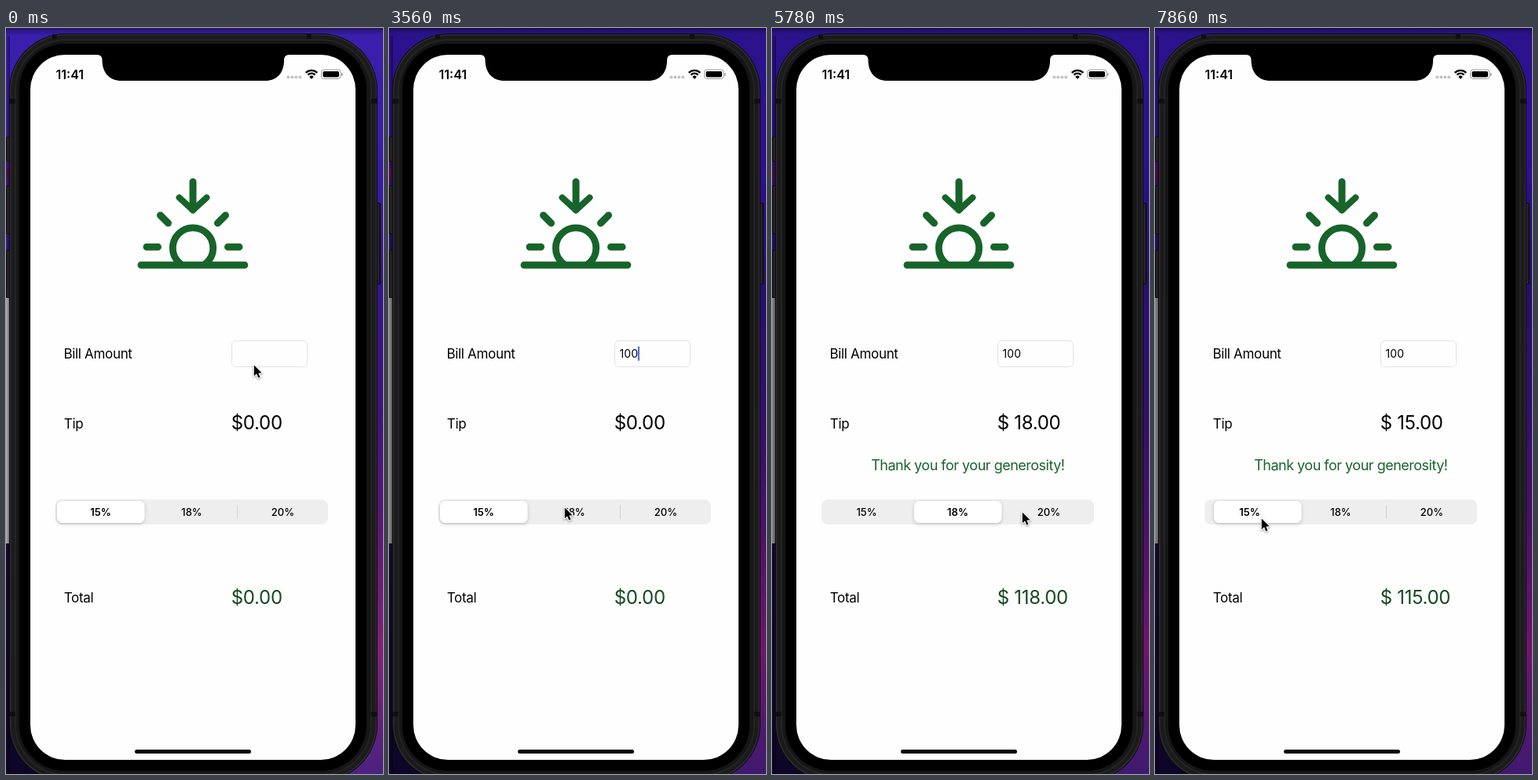
These frames come from a looping animation (480 by 948 pixels, 8000 ms). An HTML page with a canvas:

```html
<!DOCTYPE html>
<html lang="en">
<head>
<meta charset="utf-8">
<title>Tip calculator</title>
<style>
html, body { margin: 0; width: 480px; height: 948px; overflow: hidden; background: #000; }
canvas { display: block; }
</style>
</head>
<body>
<canvas id="stage" width="480" height="948"></canvas>
<script>
const ctx = document.getElementById('stage').getContext('2d');
const LOOP = 8000, TICK = 148.4;
const GREEN = '#17642b', DARK_GREEN = '#154a22';
const SEGMENTS = ['15%', '18%', '20%'];
const PILL_X = [65, 181, 297];

// [tick, value]: each value holds until the next key
const TYPED = [[0, ''], [9, '1'], [14, '10'], [15, '100']];
const CARET = [
  [0, 0], [4, 1], [7, .4], [8, 0], [9, 1], [12, .4], [13, 0], [14, 1],
  [18, .4], [19, 0], [22, .4], [23, 1], [26, .4], [27, 0],
  [32, .2], [33, .5], [34, .8], [35, 1], [37, .4], [38, 0],
  [41, .4], [42, 1], [45, .4], [46, 0], [49, .4], [50, 1], [52, .4], [53, 0]
];
const PICKS = [
  { at: 25, from: 0, to: 1, tip: 18 },
  { at: 41, from: 1, to: 2, tip: 20 },
  { at: 52, from: 2, to: 0, tip: 15 }
];
const MOVES = [
  { start: 0, end: 2, from: [315, 428], to: [305, 411], dip: 0 },
  { start: 17, end: 24, from: [305, 411], to: [223, 609], dip: 0 },
  { start: 36, end: 39, from: [223, 609], to: [318, 615], dip: 0 },
  { start: 44, end: 50, from: [318, 615], to: [135, 623], dip: 3 }
];

const held = (keys, n) => keys.filter(k => k[0] <= n).pop()[1];

function box(x, y, w, h, r, fill) {
  ctx.beginPath();
  ctx.roundRect(x, y, w, h, r);
  if (fill) {
    ctx.fillStyle = fill;
    ctx.fill();
  }
}

function lines(color, width, ...paths) {
  ctx.strokeStyle = color;
  ctx.lineWidth = width;
  ctx.lineCap = ctx.lineJoin = 'round';
  ctx.beginPath();
  for (const [first, ...rest] of paths) {
    ctx.moveTo(...first);
    rest.forEach(p => ctx.lineTo(...p));
  }
  ctx.stroke();
}

function label(text, x, y, size, { color = '#000', weight = 400, spacing = 0, align = 'left' } = {}) {
  ctx.font = `${weight} ${size}px Inter, sans-serif`;
  ctx.letterSpacing = spacing + 'px';
  ctx.textAlign = align;
  ctx.fillStyle = color;
  ctx.fillText(text, x, y);
}

function gradient(y0, y1, ...colors) {
  const g = ctx.createLinearGradient(0, y0, 0, y1);
  colors.forEach((c, i) => g.addColorStop(i / (colors.length - 1), c));
  return g;
}

function drawDesktop(focused) {
  ctx.fillStyle = focused
    ? gradient(0, 948, '#2b138c', '#2c1192', '#27106f', '#300f6d', '#4b1069', '#6f1570', '#3f1a70')
    : gradient(0, 948, '#3a1fae', '#3a1cae', '#33168c', '#3d1480', '#5c1678', '#84207c', '#4c2280');
  ctx.fillRect(0, 0, 480, 948);
  ctx.fillStyle = gradient(0, 10, focused ? '#1c0b50' : '#271360', 'rgba(40,20,130,0)');
  ctx.fillRect(0, 0, 480, 10);
  ctx.fillStyle = gradient(165, 205, 'rgba(90,10,80,0)', '#560d52', 'rgba(90,10,80,0)');
  ctx.fillRect(0, 165, 10, 40);
  ctx.fillStyle = gradient(655, 948, '#170a3c', '#120830', '#0e0628');
  ctx.fillRect(0, 655, 240, 293);
  ctx.fillStyle = focused ? '#8f8f90' : '#b4b4b5';
  ctx.fillRect(0, 343, 8, 312);
  const shade = ctx.createLinearGradient(0, 0, 5, 0);
  shade.addColorStop(0, 'rgba(0,0,0,0)');
  shade.addColorStop(1, 'rgba(0,0,0,.45)');
  ctx.fillStyle = shade;
  ctx.fillRect(0, 10, 5, 938);
}

function drawPhone() {
  for (const [y, h] of [[138, 32], [200, 62], [282, 61]]) {
    box(0, y, 8, h, 2, '#0b0b0c');
    box(1, y + 1, 7, h - 2, 1, '#232325');
  }
  box(466, 222, 11, 104, 2, '#0b0b0c');
  box(466, 223, 9.5, 102, 1, '#262628');

  box(4, 7, 469, 950, 72, '#0c0c0d');
  box(5, 8, 467, 948, 71, '#2c2c2e');
  box(6.5, 9.5, 464, 945, 70, '#1b1b1c');
  box(11, 14, 455, 936, 65, '#242425');
  box(13, 16, 451, 932, 63, '#161617');
  ctx.fillStyle = '#101011';
  for (const y of [90, 869]) {
    ctx.fillRect(5, y, 7, 6);
    ctx.fillRect(465, y, 7, 6);
  }
  for (const x of [59, 383]) ctx.fillRect(x, 8, 6, 6);
  box(17, 20, 442, 924, 58, '#000');
  box(31, 34, 414, 896, 44, '#fefefe');

  ctx.fillStyle = '#000';
  ctx.beginPath();
  ctx.moveTo(116, 33);
  ctx.lineTo(116, 34);
  ctx.quadraticCurveTo(122.5, 34, 122.5, 41);
  ctx.bezierCurveTo(122.5, 57, 132, 67, 147, 67);
  ctx.lineTo(330, 67);
  ctx.bezierCurveTo(345, 67, 354, 57, 354, 41);
  ctx.quadraticCurveTo(354, 34, 360.5, 34);
  ctx.lineTo(360.5, 33);
  ctx.fill();
  box(164, 917, 148, 5, 2.5, '#000');
}

function drawStatusBar() {
  label('11:41', 63.5, 65, 16, { weight: 600 });
  for (let i = 0; i < 4; i++) box(357.3 + 5 * i, 60.5, 4, 4, 2, '#c4c4c6');

  ctx.strokeStyle = '#000';
  ctx.lineCap = 'butt';
  ctx.lineWidth = 2.3;
  for (const r of [10.3, 6.5]) {
    ctx.beginPath();
    ctx.arc(389, 64.2, r, -Math.PI * .75, -Math.PI * .25);
    ctx.stroke();
  }
  ctx.fillStyle = '#000';
  ctx.beginPath();
  ctx.moveTo(389, 65);
  ctx.arc(389, 64.6, 3.8, -Math.PI * .75, -Math.PI * .25);
  ctx.fill();

  box(401.5, 53, 24.5, 11.5, 3.4);
  ctx.strokeStyle = '#9c9c9e';
  ctx.lineWidth = 1;
  ctx.stroke();
  box(403.5, 55, 20.5, 7.5, 1.8, '#000');
  box(427, 57, 1.5, 4, 1, '#9c9c9e');
}

function drawSunset() {
  lines(GREEN, 9,
    [[238, 195.5], [238, 231]],
    [[196.5, 238], [206.5, 248]],
    [[279.5, 238], [269.5, 248]],
    [[179, 278.2], [193.5, 278.2]],
    [[282.5, 278.2], [297, 278.2]],
    [[172, 301.3], [303.8, 301.3]]);
  lines(GREEN, 8, [[220.5, 215.5], [238, 231.5], [255.5, 215.5]]);
  ctx.save();
  ctx.beginPath();
  ctx.rect(200, 240, 76, 61);
  ctx.clip();
  ctx.beginPath();
  ctx.arc(238, 279.5, 25.7, 0, Math.PI * 2);
  ctx.lineWidth = 8.8;
  ctx.stroke();
  ctx.restore();
}

function drawField(n) {
  box(287.5, 397.5, 96, 33, 5, '#fefefe');
  ctx.strokeStyle = '#e2e2e3';
  ctx.lineWidth = 1;
  ctx.stroke();
  const typed = held(TYPED, n);
  label(typed, 293.6, 419, 14);
  const caretX = 294 + ctx.measureText(typed).width - .5;
  ctx.globalAlpha = held(CARET, n);
  box(caretX, 404.5, 2, 18.5, 1, '#4366d6');
  ctx.globalAlpha = 1;
}

function drawAmounts(pick) {
  const row = { spacing: -.33 };
  label('Bill Amount', 73.5, 420.3, 17, row);
  label('Tip', 73.8, 508.5, 17, row);
  label('Total', 73.8, 729.5, 17, row);
  const money = v => pick ? '$ ' + v.toFixed(2) : '$0.00';
  const tip = pick ? pick.tip : 0;
  label(money(tip), 286.7, 510, 24, { spacing: -.3 });
  label(money(100 + tip), 286.7, 732, 24, { spacing: -.3, color: DARK_GREEN });
  if (pick) {
    label('Thank you for your generosity!', 249.3, 562, 18, { color: GREEN, spacing: -.5, align: 'center' });
  }
}

function drawSegments(n, pick) {
  const selected = pick ? pick.to : 0;
  let x = PILL_X[selected];
  if (pick) x -= (x - PILL_X[pick.from]) * .77 * .056 ** (n - pick.at);
  box(63, 599, 347, 32, 8.5, '#eeeeef');
  ctx.fillStyle = '#d3d3d6';
  if (selected === 2) ctx.fillRect(178, 606, 1, 18);
  if (selected === 0) ctx.fillRect(294, 606, 1, 18);
  ctx.save();
  ctx.shadowColor = 'rgba(0,0,0,.2)';
  ctx.shadowBlur = 4;
  ctx.shadowOffsetY = 1.5;
  box(x, 601, 111.5, 28, 6.5, '#fff');
  ctx.restore();
  SEGMENTS.forEach((text, i) =>
    label(text, 120.5 + 116 * i, 619.7, 13, { weight: i === selected ? 600 : 500, align: 'center' }));
}

function drawPointer(n) {
  const m = MOVES.filter(move => move.start <= n).pop();
  const u = Math.min(1, (n - m.start) / (m.end - m.start));
  const p = u * u * (3 - 2 * u);
  const [x, y] = m.from.map((v, i) => v + (m.to[i] - v) * p);
  ctx.save();
  ctx.translate(x + .8, y + .6 + m.dip * Math.sin(Math.PI * p));
  ctx.beginPath();
  for (const q of [[0, 0], [0, 13.6], [3.2, 10.7], [5.4, 15.8], [7.7, 14.8], [5.5, 9.9], [9.8, 9.7]]) ctx.lineTo(...q);
  ctx.closePath();
  ctx.lineJoin = 'round';
  ctx.lineWidth = 2.4;
  ctx.strokeStyle = '#fff';
  ctx.shadowColor = 'rgba(0,0,0,.4)';
  ctx.shadowBlur = 2.5;
  ctx.shadowOffsetY = 1;
  ctx.stroke();
  ctx.shadowColor = 'transparent';
  ctx.fillStyle = '#000';
  ctx.fill();
  ctx.restore();
}

function draw(now) {
  const n = Math.floor((now % LOOP + 9) / TICK);
  const pick = PICKS.filter(p => p.at <= n).pop();
  drawDesktop(n >= 3);
  drawPhone();
  drawStatusBar();
  drawSunset();
  drawField(n);
  drawAmounts(pick);
  drawSegments(n, pick);
  drawPointer(n);
}

const began = performance.now();
function loop() {
  draw(performance.now() - began);
  requestAnimationFrame(loop);
}
loop();
</script>
</body>
</html>
```
